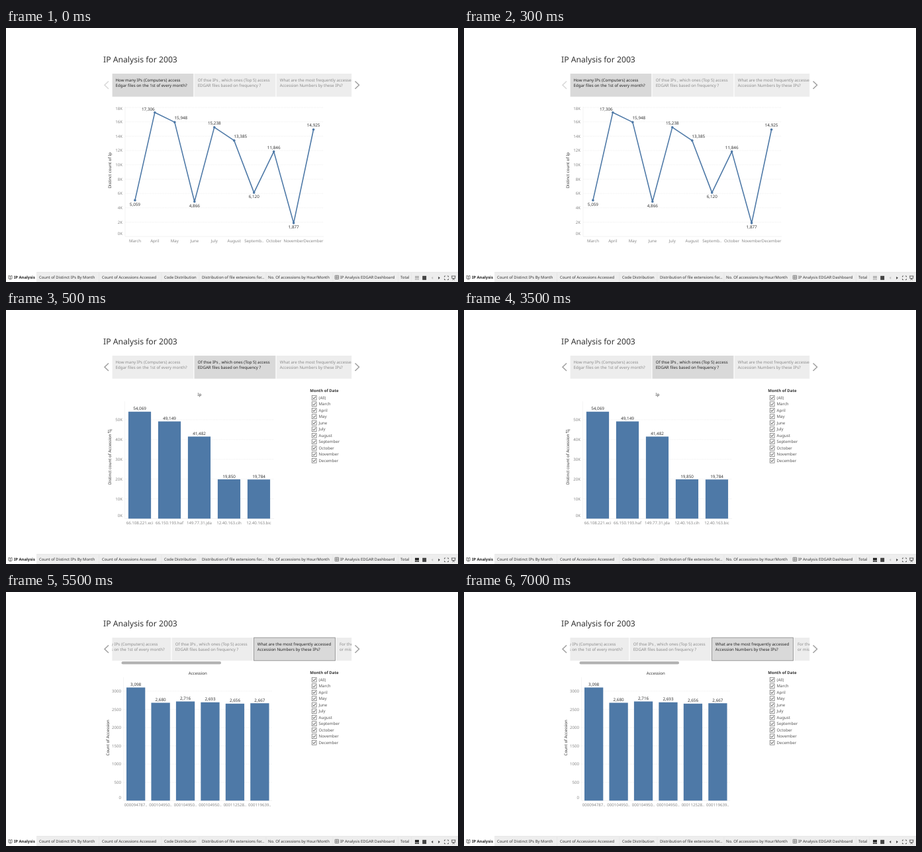
An HTML page that plays this animation: 683 by 384 pixels, repeating every 8000 ms.

```html
<!DOCTYPE html>
<html lang="en">
<head>
<meta charset="utf-8">
<title>IP Analysis</title>
<style>
  html, body { margin: 0; width: 100%; height: 100%; overflow: hidden; background: #fff; }
  svg { display: block; width: 683px; height: 384px; }
  text { font-family: "Noto Sans", "Open Sans", sans-serif; white-space: pre; text-rendering: geometricPrecision; }
</style>
</head>
<body>
<svg id="stage" viewBox="0 0 683 384" xmlns="http://www.w3.org/2000/svg"></svg>
<script>
const BLUE = '#4e79a7', DARK = '#333', GREY = '#868686', GRID = '#ececec';
const LOOP = 8000, CUTS = [0, 500, 5500, LOOP];
const MONTHS = ['March', 'April', 'May', 'June', 'July', 'August',
  'September', 'October', 'November', 'December'];

// y is the vertical middle of the capitals
function text(x, y, str, { size = 6.1, fill = DARK, anchor = 'start', weight = 400, extra = '' } = {}) {
  return `<text x="${x}" y="${y + size * 0.36}" font-size="${size}" fill="${fill}"
    text-anchor="${anchor}" font-weight="${weight}" ${extra}>${str}</text>`;
}
const centred = (x, y, str, opts) => text(x, y, str, { anchor: 'middle', ...opts });
const rect = (x, y, w, h, fill, extra = '') =>
  `<rect x="${x}" y="${y}" width="${w}" height="${h}" fill="${fill}" ${extra}/>`;
const path = (d, stroke, width = 1, extra = '') =>
  `<path d="${d}" fill="none" stroke="${stroke}" stroke-width="${width}" ${extra}/>`;
const shape = (d, fill) => `<path d="${d}" fill="${fill}"/>`;

const POINTS = [
  ['How many IPs (Computers) access', 'Edgar files on the 1st of every month?'],
  ['Of thse IPs , which ones (Top 5) access', 'EDGAR files based on frequency ?'],
  ['What are the most frequently accessed', 'Accession Numbers by these IPs?'],
  ['For the', 'or mis']
];

function storyPoints(active, shift, outlined) {
  const boxes = POINTS.map((lines, i) => {
    const x = 160.4 + i * 124.1 - shift, on = i === active;
    const border = on && outlined ? 'stroke="#858585" stroke-width="0.8"' : '';
    return rect(x, 69, 122.9, 34.8, on ? '#d9d9d9' : '#ededed', border) +
      lines.map((line, n) => text(x + 5.2, 78.4 + n * 8.1, line,
        { fill: on ? '#222' : '#8a8a8a' })).join('');
  }).join('');
  const bar = outlined ? rect(174.5, 105, 150.5, 4.3, '#b3b3b3', 'rx="2"') : '';
  return `<g clip-path="url(#strip)">${boxes}</g>${bar}` +
    path('M155 80.5L149 86.2L155 92', active ? '#a0a0a0' : '#d8d8d8', 1.5) +
    path('M527.5 80.5L533.5 86.2L527.5 92', '#a0a0a0', 1.5);
}

function axis({ left, right, top, zero, step, ticks, labelX, label, title, titleX, titleY }) {
  let out = path(`M${left} ${top}V${zero}`, '#efefef', 0.7);
  for (let i = 0; i <= ticks; i++) {
    const y = zero - i * step;
    out += path(`M${left} ${y}H${right}`, GRID, 0.7, i ? 'stroke-dasharray="1.5 1"' : '');
    const labelY = i === 0 ? zero - 4.2 : Math.max(y, top + 2.8);
    out += text(labelX, labelY, label(i), { fill: GREY, anchor: 'end' });
  }
  return out + centred(titleX, titleY, title,
    { weight: 500, extra: `transform="rotate(-90 ${titleX} ${titleY})"` });
}

function lineChart() {
  const zero = 315.2, step = 21.67;
  const data = [
    [5059, 0, 6], [17306, -10, -5], [15948, 9.5, -6.5], [4866, 0, 6], [15238, 0, -6.5],
    [13385, 9.5, -6.5], [6120, 0, 6], [11846, 0, -6.5], [1877, 0, 6], [14925, 0, -6.5]
  ].map(([value, dx, dy], i) => ({
    value, dx, dy, x: 194.9 + i * 29.97, y: zero - value / 2000 * step
  }));
  return axis({
    left: 180, right: 480, top: 119, zero, step, ticks: 9, labelX: 176,
    label: i => i * 2 + 'K', title: 'Distinct count of Ip', titleX: 157.2, titleY: 215.2
  }) +
    path('M' + data.map(p => `${p.x} ${p.y}`).join('L'), BLUE, 1.6, 'stroke-linejoin="round"') +
    data.map((p, i) =>
      `<circle cx="${p.x}" cy="${p.y}" r="1.8" fill="${BLUE}"/>` +
      centred(p.x + p.dx, p.y + p.dy, p.value.toLocaleString('en-US'), { size: 6.3 }) +
      centred(p.x, 321.8, i === 6 ? 'Septemb..' : MONTHS[i], { fill: GREY })).join('');
}

function bars(rows, { x, gap, width, zero, perUnit, labelGap }) {
  return rows.map(([name, value], i) => {
    const left = x + i * gap, top = zero - value * perUnit, mid = left + width / 2;
    return rect(left, top, width, zero - top, BLUE) +
      centred(mid, top - labelGap, value.toLocaleString('en-US'), { size: 6.3 }) +
      centred(mid, 321.8, name, { fill: GREY });
  }).join('');
}

function ipChart() {
  const zero = 315.4, step = 29.9;
  return centred(292.3, 128, 'Ip', { weight: 500 }) +
    axis({
      left: 179.5, right: 405, top: 138, zero, step, ticks: 5, labelX: 176,
      label: i => i * 10 + 'K', title: 'Distinct count of Accession', titleX: 157.2, titleY: 225.8
    }) +
    path('M154.8 181V186M153.7 184.9L154.8 186L155.9 184.9M156.4 181H160.4M156.4 182.7H159.4M156.4 184.4H158.2',
      '#555', 0.7) +
    bars([['66.108.221.eci', 54069], ['66.150.193.haf', 49149], ['149.77.31.jda', 41482],
      ['12.40.163.cih', 19850], ['12.40.163.bic', 19784]],
    { x: 184.9, gap: 45, width: 34.2, zero, perUnit: step / 10000, labelGap: 4.8 });
}

function accessionChart() {
  const zero = 315.4, step = 27.6;
  return centred(289.8, 122.8, 'Accession', { weight: 500 }) +
    axis({
      left: 177.5, right: 402, top: 129, zero, step, ticks: 6, labelX: 174,
      label: i => i * 500, title: 'Count of Accession', titleX: 154.2, titleY: 220.3
    }) +
    bars([['000094787..', 3098], ['000104950..', 2680], ['000104950..', 2716],
      ['000104950..', 2693], ['000112528..', 2656], ['000119639..', 2667]],
    { x: 182, gap: 37.45, width: 28.3, zero, perUnit: step / 500, labelGap: 4.8 });
}

function monthFilter() {
  return text(459.3, 121.6, 'Month of Date', { size: 6, weight: 600 }) +
    ['(All)', ...MONTHS].map((name, i) => {
      const y = 132.7 + i * 9.5;
      return rect(462.3, y - 3.4, 6.8, 6.8, '#fff', 'stroke="#777" stroke-width="0.8"') +
        path(`M463.8 ${y}L465.2 ${y + 1.6}L467.8 ${y - 1.7}`, '#333', 0.9) +
        text(472.6, y, name, { fill: '#555' });
    }).join('');
}

function toolbar(scene) {
  const film = scene ? '#222' : '#b5b5b5';
  const back = scene === 2 ? '#444' : '#c4c4c4';
  return rect(618, 374.8, 6, 3.6, film) +
    [618, 620.2, 622.4].map(x => rect(x, 379, 1.6, 1.8, film)).join('') +
    shape('M645.2 375.7V379.9L642.7 377.8Z', back);
}

function frameParts() {
  const tabs = [
    [50, 'Count of Distinct IPs By Month'], [145, 'Count of Accessions Accessed'],
    [239, 'Code Distribution'], [296, 'Distribution of file extensions for...'],
    [396, 'No. Of accessions by Hour/Month'], [505, 'IP Analysis EDGAR Dashboard'], [596, 'Total']
  ];
  const dividers = [140.5, 235, 292, 393, 494, 592.5, 612.5];
  return text(147, 47.4, 'IP Analysis for 2003', { size: 12.2 }) +
    rect(0, 369, 683, 15, '#eee') + rect(0, 369, 46, 15, '#fff') +
    path('M46 369.3H683', '#dedede', 0.6) +
    dividers.map(x => path(`M${x} 370V384`, '#e2e2e2', 0.6)).join('') +
    text(12, 376.6, 'IP Analysis', { size: 5.9, weight: 700, fill: '#222' }) +
    tabs.map(([x, name]) => text(x, 376.6, name, { size: 5.9 })).join('') +
    path('M6.5 375.2L4 374.4V379L6.5 379.8L9 379V374.4ZV379.8', '#444', 0.7) +
    path('M497.2 374.2H502.6V379.6H497.2ZM499.9 374.2V379.6M497.2 376.9H502.6', '#555', 0.7) +
    rect(629.3, 374.8, 5.8, 6, '#333') +
    path('M631.2 374.8V380.8M633.2 374.8V380.8M629.3 376.8H635.1M629.3 378.8H635.1', '#777', 0.3) +
    shape('M653.3 375.7V379.9L655.8 377.8Z', '#333') +
    path('M662.5 376.6V375H664.2M666.8 375H668.5V376.6M668.5 379V380.6H666.8M664.2 380.6H662.5V379', '#444', 0.8) +
    path('M673 375H679.4M673.8 375V378.6H678.6V375M676.2 378.6V380M674.6 380.9L676.2 379.6L677.8 380.9', '#444', 0.8);
}

const scenes = [
  storyPoints(0, 0, false) + lineChart(),
  storyPoints(1, 0, false) + ipChart() + monthFilter(),
  storyPoints(2, 34, true) + accessionChart() + monthFilter()
];

const stage = document.getElementById('stage');
stage.innerHTML =
  '<defs><clipPath id="strip"><rect x="160.4" y="68" width="361.8" height="37"/></clipPath></defs>' +
  frameParts() +
  scenes.map((body, i) => `<g class="scene">${body}${toolbar(i)}</g>`).join('');

const groups = [...stage.querySelectorAll('.scene')];
function draw(now) {
  const time = now % LOOP;
  groups.forEach((group, i) => {
    const shown = time >= CUTS[i] && time < CUTS[i + 1];
    group.setAttribute('visibility', shown ? 'visible' : 'hidden');
  });
}
const start = performance.now();
draw(0);
requestAnimationFrame(function tick() {
  draw(performance.now() - start);
  requestAnimationFrame(tick);
});
</script>
</body>
</html>
```
